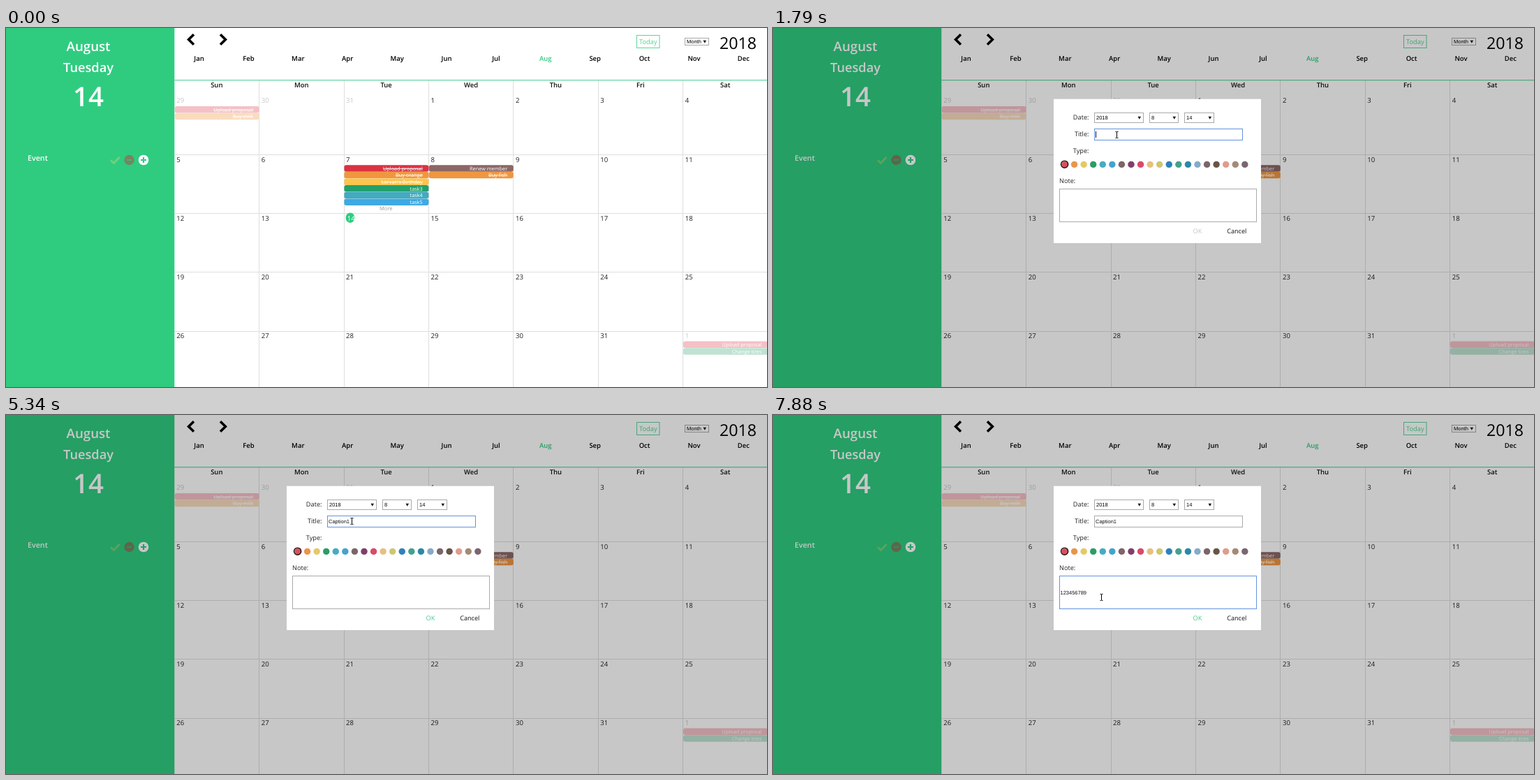
An HTML page that plays this animation: 1090x514 px, repeating every 8 s.

```html
<!DOCTYPE html>
<html lang="en">
<head>
<meta charset="utf-8">
<title>Calendar</title>
<style>
html, body { margin: 0; width: 100%; height: 100%; overflow: hidden; background: #fff; }
svg { display: block; width: 1090px; height: 514px; }
text { font-family: "Open Sans", "Noto Sans", sans-serif; text-rendering: geometricPrecision; white-space: pre; }
.bold { font-weight: 600; }
.form { font-family: "Liberation Sans", Arial, sans-serif; }
.done { text-decoration: line-through; }
.mid { text-anchor: middle; }
.end { text-anchor: end; }
</style>
</head>
<body>
<svg id="stage" viewBox="0 0 1090 514" xmlns="http://www.w3.org/2000/svg"></svg>
<script>
const stage = document.getElementById('stage');
const GREEN = '#2fcc80', LOOP = 8000;
let parent = stage;

function el(tag, attrs, content) {
  const node = document.createElementNS(stage.namespaceURI, tag);
  for (const key in attrs) node.setAttribute(key, attrs[key]);
  if (content) node.textContent = content;
  return parent.appendChild(node);
}
const text = (x, y, size, fill, content, cls = '') =>
  el('text', { x, y, 'font-size': size, fill, class: cls }, content);
const rect = (x, y, width, height, fill, more) =>
  el('rect', { x, y, width, height, fill, ...more });
const circle = (cx, cy, r, fill, more) => el('circle', { cx, cy, r, fill, ...more });
const stroke = (d, color, width, more) =>
  el('path', { d, fill: 'none', stroke: color, 'stroke-width': width, ...more });
const box = (x, y, w, h, color) => rect(x, y, w, h, '#fff', { stroke: color });
const group = attrs => { parent = stage; return parent = el('g', attrs); };

function select(x, y, w, h, label, baseline) {
  box(x, y, w, h, '#a9a9a9');
  text(x + 2.5, baseline, 7.5, '#000', label, 'form');
  el('path', { d: `M${x + w - 8} ${y + h / 2 - 1.8}h4.6l-2.3 4z`, fill: '#111' });
}

// Sidebar
rect(0, 0, 241.3, 514, GREEN);
text(118, 33, 18.7, '#fff', 'August', 'bold mid');
text(118, 62.5, 18.2, '#fff', 'Tuesday', 'bold mid');
text(118, 112, 38.5, '#fff', '14', 'bold mid');
text(31, 190, 10.7, '#fff', 'Event', 'bold');
stroke('M150 189.3l4.4 4.2 8.2-8.6', '#74d077', 2.9);
circle(176.5, 189, 7.2, '#78835f');
stroke('M172.8 189h7.4', '#3fb476', 2);
circle(197, 189, 7.3, '#fff');
stroke('M193 189h8M197 185v8', GREEN, 2.2);

// Header
stroke('M269 9.2l-7.4 7.3 7.4 7.3M307 9.2l7.4 7.3-7.4 7.3', '#000', 3.6);
box(903.5, 10.5, 32.5, 18, '#5bd49c');
text(919.8, 23, 9.3, '#4fd190', 'Today', 'mid');
select(972.5, 14.5, 34, 10, 'Month', 22.2);
text(1022, 30, 23.2, '#000', '2018');
'Jan Feb Mar Apr May Jun Jul Aug Sep Oct Nov Dec'.split(' ').forEach((m, i) =>
  text(276.5 + 70.9 * i, 46.5, 9.5, m === 'Aug' ? GREEN : '#000', m, 'bold mid'));

// Grid
const colX = i => 241.3 + 121.4 * i, rowY = i => 97 + 84.15 * i;
'Sun Mon Tue Wed Thu Fri Sat'.split(' ').forEach((d, i) =>
  text(colX(i) + 60.5, 85, 9.5, '#111', d, 'bold mid'));
for (let i = 1; i < 7; i++) rect(Math.floor(colX(i)), 75, 1, 439, '#dedede');
for (let i = 1; i < 5; i++) rect(241.3, Math.round(rowY(i)), 849, 1, '#dedede');
rect(241.3, 74, 849, 1.3, '#6ad8a5');
el('ellipse', { cx: 493, cy: 271.7, rx: 6.4, ry: 7.2, fill: GREEN });
for (let i = 0; i < 35; i++) {
  const day = i - 2, inMonth = day > 0 && day < 32;
  const label = day < 1 ? day + 31 : day > 31 ? day - 31 : day;
  const fill = day === 14 ? '#fff' : inMonth ? '#222' : '#c8c8c8';
  text(colX(i % 7) + (day === 14 ? 4.6 : 3), rowY(i / 7 | 0) + 10.4, 9.6, fill, String(label));
}

function events(col, row, list) {
  list.forEach(([color, label, done], i) => {
    const x = colX(col), y = rowY(row) + 15 + 9.65 * i;
    rect(x + .3, y, 121, 9.5, color, { rx: 3 });
    text(x + 112.7, y + 7.6, 7.35, '#fff', label, done ? 'end done' : 'end');
  });
}
events(0, 0, [['#f5c0c6', 'Upload proposal', 1], ['#f8dcbd', 'Buy milk', 1]]);
events(2, 1, [
  ['#da3341', 'Upload proposal', 1], ['#f0963f', 'Buy orange', 1],
  ['#fcc54d', "Lorvan's Birthday", 1], ['#22a06c', 'task3'],
  ['#42abbd', 'task4'], ['#3fa9e3', 'task5']
]);
events(3, 1, [['#8c6766', 'Renew member'], ['#f0963f', 'Buy fish', 1]]);
events(6, 4, [['#f5c0c6', 'Upload proposal'], ['#bfe2d2', 'Change tires']]);
text(544.3, 261, 7.6, '#999', 'More', 'mid');

// Dialog
const dialog = group();
rect(0, 0, 1090, 514, '#000', { opacity: .22 });
rect(402, 101.7, 297, 206.3, '#fff');
text(452.5, 131.4, 9.2, '#222', 'Date:', 'end');
text(452.5, 155.2, 9.2, '#222', 'Title:', 'end');
text(452.5, 179, 9.2, '#222', 'Type:', 'end');
text(410, 222.4, 9.2, '#222', 'Note:');
select(460.5, 121.5, 70, 14, '2018', 131.2);
select(539.5, 121.5, 41, 14, '8', 131.2);
select(589.5, 121.5, 42, 14, '14', 131.2);
const types = ('d9505c e8964a e6c866 2a9d68 48aac4 44a3cf 7d6468 7f3f6a d94a6a e6c080 ' +
  'cfc674 2f82b8 46a08c 2a88a8 86aac8 7c6468 685448 e09c8c a48a76 7a6570').split(' ');
types.forEach((c, i) => circle(418 + 13.57 * i, 195.4, 4.7, '#' + c));
circle(417.6, 195.2, 5.1, 'none', { stroke: '#1a1014', 'stroke-width': 1.4 });
const ok = text(608, 294, 9.2, '#c4c4c4', 'OK', 'mid');
text(664.3, 294, 9.1, '#111', 'Cancel', 'mid');

function field(x, y, w, h, textX, baseline) {
  return {
    x: textX,
    frame: box(x, y, w, h, '#aaa'),
    value: text(textX, baseline, 7.5, '#111', '', 'form'),
    caret: rect(textX, baseline - 7, 1, 9, '#111')
  };
}
const title = field(460.5, 144.5, 212, 16, 462, 155);
const note = field(410.5, 230.5, 282, 47, 411.5, 256.6);

// Pointers
const pointer = group();
const shapes = {
  arrow: el('path', { d: 'M0 0V10L2.3 8L3.9 11.5L5.5 10.8L4 7.4H7Z' }),
  hand: el('path', { d: 'M1.3 1C1.3-.3 3.1-.3 3.1 1V4.8C5 4.4 7.4 5 8.5 6.2V9.6L7.6 13.2H2.7L-.6 8.8C-.5 7.3 .5 7.3 1.3 8.2Z' }),
  beam: el('path', { d: 'M-2-4.6H-.6L0-4L.6-4.6H2M-2 4.6H-.6L0 4L.6 4.6H2M0-4V4' })
};
for (const name in shapes) {
  shapes[name].setAttribute('stroke', '#000');
  shapes[name].setAttribute('stroke-width', name === 'beam' ? 1 : .8);
  shapes[name].setAttribute('fill', name === 'beam' ? 'none' : '#fff');
}

// Timelines: [time, value...]
const moves = [
  [0, ''],
  [240, 'arrow', 710, 441], [360, 'arrow', 612, 396], [490, 'arrow', 455, 318],
  [610, 'arrow', 320, 250], [740, 'arrow', 232, 206], [860, 'arrow', 199, 190.5],
  [1000, 'hand', 199, 189.5], [1140, 'arrow', 201, 189], [1260, 'arrow', 340, 184],
  [1390, 'arrow', 475.5, 175], [1530, 'arrow', 485.5, 152.5], [1670, 'beam', 492.5, 153],
  [5230, 'beam', 494.5, 146], [5340, 'beam', 495.5, 152], [5500, 'arrow', 481, 222],
  [5610, 'beam', 468.5, 271], [5750, 'beam', 470.5, 261]
];
const titleKeys = [[0, 0], [2710, 1], [3140, 2], [3390, 3], [4040, 4], [4180, 5], [4310, 6], [4430, 7], [4810, 8]];
const noteKeys = [[0, 0], [6560, 1], [6670, 2], [6790, 3], [7070, 5], [7200, 6], [7470, 9]];
const titleCaret = [[0, 0], [1790, 1], [2190, 0], [2590, 1], [3790, 0], [4040, 1], [5230, 0]];
const noteCaret = [[0, 0], [5750, 1], [6150, 0], [6560, 1], [7880, 0]];

const at = (line, t) => line.reduce((hit, step) => step[0] <= t ? step : hit);
const show = (node, on) => node.setAttribute('visibility', on ? 'inherit' : 'hidden');

function update(f, content, focused, caretOn) {
  if (f.value.textContent !== content) f.value.textContent = content;
  f.frame.setAttribute('stroke', focused ? '#6492dd' : '#aaa');
  const width = content ? f.value.getComputedTextLength() : 0;
  f.caret.setAttribute('x', Math.floor(f.x + width));
  show(f.caret, caretOn);
}

function draw(now) {
  const t = now % LOOP;
  show(dialog, t >= 1140);
  update(title, 'Caption1'.slice(0, at(titleKeys, t)[1]), t >= 1790 && t < 5750, at(titleCaret, t)[1]);
  update(note, '123456789'.slice(0, at(noteKeys, t)[1]), t >= 5750, at(noteCaret, t)[1]);
  ok.setAttribute('fill', t < 2710 ? '#c4c4c4' : '#48ca8c');
  const [, shape, x = 0, y = 0] = at(moves, t);
  for (const name in shapes) show(shapes[name], name === shape);
  pointer.setAttribute('transform', `translate(${x} ${y})`);
}

function tick() {
  draw(performance.now());
  requestAnimationFrame(tick);
}
tick();
</script>
</body>
</html>
```
